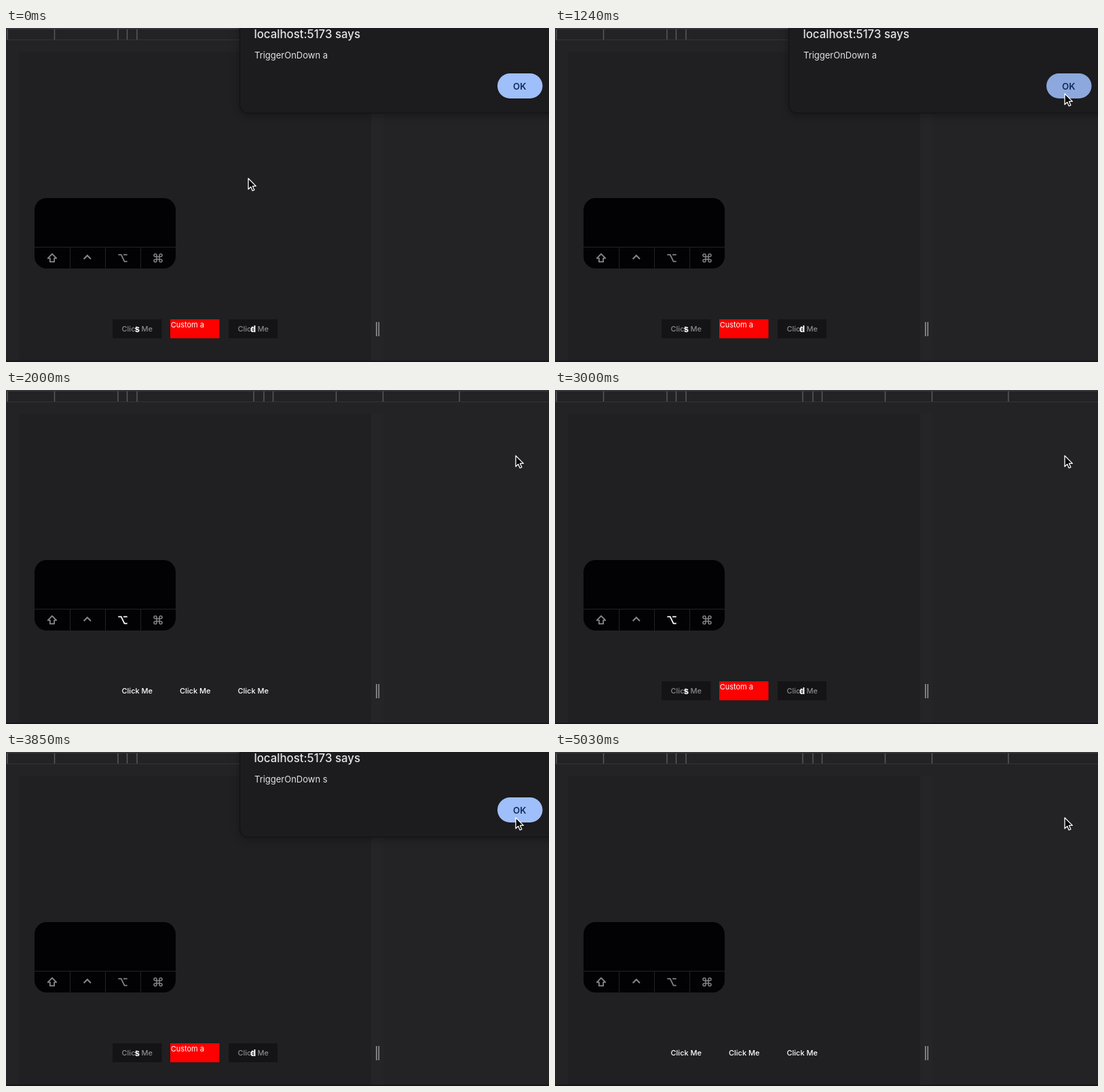
Recreate the animation shown at these times as an HTML page. Size 800 by 493 pixels, loop 5.88 s.

```html
<!DOCTYPE html>
<html lang="en">
<head>
<meta charset="utf-8">
<title>Keyboard hints</title>
<style>
html, body { margin: 0; width: 100%; height: 100%; overflow: hidden; background: #232225; }
svg { position: absolute; left: 0; top: 0; overflow: hidden; font-family: Inter, Roboto, sans-serif; }
.label { font-size: 11px; font-weight: 500; fill: #fff; text-anchor: middle; }
.dim { fill: #8b8a8c; }
.key { font-size: 13px; font-weight: 700; fill: #fff; text-anchor: middle; }
.icons path { fill: none; stroke: #858585; stroke-width: 1.8; }

/* one shared clock: 5880 ms */
.hint, #opt, #dialog, #ok, #cursor, .msg { animation: 5880ms linear infinite; }
.hint, .icons #opt, .msg { animation-timing-function: step-end; }

#h1 { animation-name: h1; }
#h2 { animation-name: h2; }
#h3 { animation-name: h3; }
@keyframes h1 { 0%, 39.12% { opacity: 1 } 22.62%, 82.48%, 100% { opacity: 0 } }
@keyframes h2 { 0%, 39.63% { opacity: 1 } 22.62%, 85.03%, 100% { opacity: 0 } }
@keyframes h3 { 0%, 40.14% { opacity: 1 } 26.87%, 85.54%, 100% { opacity: 0 } }

#opt { animation-name: opt; }
@keyframes opt { 0%, 60.37%, 100% { stroke: #858585 } 34.01% { stroke: #fff } }

#msgA { animation-name: msgA; }
#msgS { animation-name: msgS; }
@keyframes msgA { 0% { opacity: 1 } 42%, 100% { opacity: 0 } }
@keyframes msgS { 0% { opacity: 0 } 42%, 100% { opacity: 1 } }

#dialog { overflow: visible; transform-origin: 609px 125px; animation-name: dialog; }
@keyframes dialog {
  0%, 21.6%, 63.27%, 79.93% {
    opacity: 1;
    transform: translateY(0) scale(1) perspective(680px) rotateX(0deg);
  }
  24.15%, 59.86%, 82.48%, 100% {
    opacity: 0;
    transform: translateY(-25px) scale(.975) perspective(680px) rotateX(11.5deg);
  }
}
.sheet { fill: #1c1b1d; stroke: #111012; filter: drop-shadow(0 3px 6px rgba(0, 0, 0, .3)); }

#ok { animation-name: ok; }
@keyframes ok {
  0%, 10.2% { fill: #9fbffb }
  13.43%, 16.5% { fill: #93b0e8 }
  19.05%, 24.15% { fill: #8ca8dd }
  24.2%, 66.5% { fill: #9fbffb }
  69.05%, 73.64% { fill: #93b0e8 }
  76.19%, 100% { fill: #8ca8dd }
}

#cursor { animation-name: cursor; }
@keyframes cursor {
  0%, .51% { transform: translate(357px, 222px); animation-timing-function: cubic-bezier(.45, 0, .3, 1) }
  10.37%, 11.4% { transform: translate(749px, 97px) }
  13.43%, 100% { transform: translate(751px, 97px) }
}
</style>
</head>
<body>
<svg width="800" height="493" viewBox="0 0 800 493">
  <rect width="800" height="493" fill="#232225"/>
  <rect x="538" y="35" width="18" height="456" fill="#252427"/>
  <rect x="19" y="35" width="519" height="456" fill="#201f21"/>
  <rect y="491" width="800" height="2" fill="#1b151b"/>

  <path d="M0 1H800" stroke="#3e3d40" stroke-width="1.5"/>
  <path d="M0 17.5H800" stroke="#343336"/>
  <path stroke="#5c5b5e" stroke-width="1.4" d="M2 2v15M71.5 2v15M165 2v15M178.5 2v15M193 2v15M365 2v15M380 2v15M393.5 2v15M486.5 2v15M555.5 2v15M668 2v15"/>
  <path d="M545.8 434v21M549.3 434v21" stroke="#929194" stroke-width="1.6"/>

  <rect x="42" y="251" width="208" height="104" rx="18" fill="#020103"/>
  <path d="M42 323.5H250M94.5 323.5V355M146.5 323.5V355M198.5 323.5V355" stroke="#232224"/>
  <g class="icons">
    <path d="M68 333.5l6.3 6.4h-3.2v5.3h-6.2v-5.3h-3.2z" stroke-linejoin="round"/>
    <path d="M114.6 341l5.2-5.3 5.2 5.3" style="stroke-width:2.1"/>
    <path id="opt" d="M165.3 334.6h4.4l4.8 10h4.2M173 334.6h5.7"/>
    <path d="M226 337.5v-2a2 2 0 1 1 2 2h-8a2 2 0 1 1 2-2v8a2 2 0 1 1-2-2h8a2 2 0 1 1-2 2z" style="stroke-width:1.5"/>
  </g>

  <text class="label" x="193.3" y="448">Click Me</text>
  <text class="label" x="278.7" y="448">Click Me</text>
  <text class="label" x="364.2" y="448">Click Me</text>

  <g class="hint" id="h1">
    <rect x="157" y="430" width="72.5" height="28" fill="#141315"/>
    <text class="label dim" x="193.3" y="448">Click Me</text>
    <text class="key" x="193.3" y="448.5">s</text>
  </g>
  <g class="hint" id="h2">
    <rect x="242" y="430" width="72.5" height="28" fill="#fe0000"/>
    <text x="242.7" y="442" font-size="11" fill="#fff">Custom a</text>
  </g>
  <g class="hint" id="h3">
    <rect x="328" y="430" width="72" height="28" fill="#141315"/>
    <text class="label dim" x="364.2" y="448">Click Me</text>
    <text class="key" x="364.2" y="448.5">d</text>
  </g>
</svg>

<svg id="dialog" width="800" height="493" viewBox="0 0 800 493">
  <rect class="sheet" x="344.5" y="-60" width="529" height="185.5" rx="12"/>
  <text x="365.5" y="15" font-size="16.8" font-weight="500" fill="#e4e3e5">localhost:5173 says</text>
  <g font-size="13" fill="#e4e3e5">
    <text class="msg" id="msgA" x="366" y="45">TriggerOnDown a</text>
    <text class="msg" id="msgS" x="366" y="45">TriggerOnDown s</text>
  </g>
  <rect id="ok" x="724" y="67" width="66.5" height="37" rx="18.5" fill="#9fbffb"/>
  <text x="756.8" y="90.8" font-size="13.2" font-weight="600" fill="#102c5c" text-anchor="middle">OK</text>
</svg>

<svg width="800" height="493" viewBox="0 0 800 493">
  <path id="cursor" d="M0 0V16L3.7 12.5 6.2 18.2 8.9 17 6.4 11.4H11.3Z" fill="#000" stroke="#fff" stroke-width="1.3" stroke-linejoin="round"/>
</svg>
</body>
</html>
```
